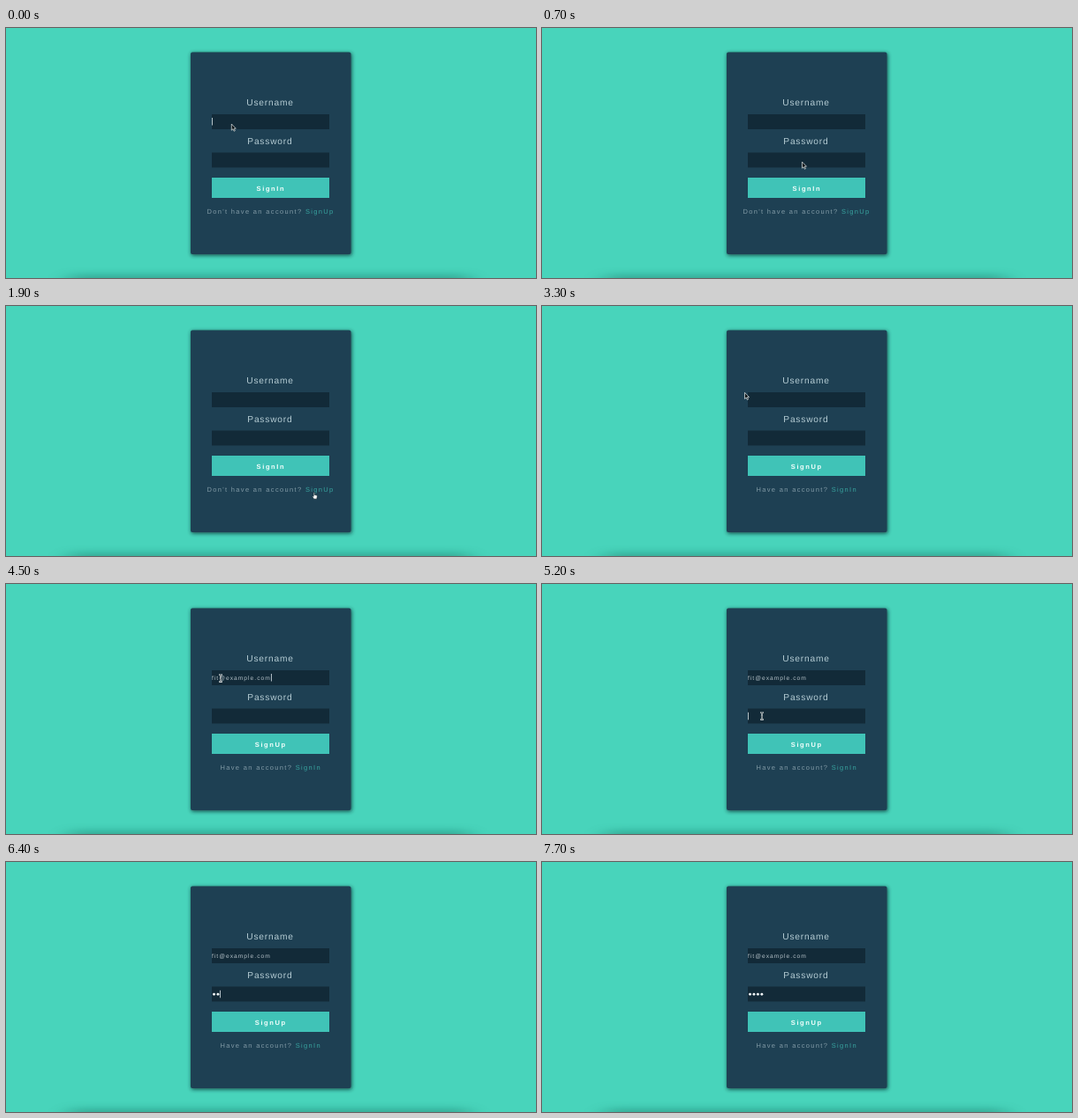
An HTML page that plays this animation: 600x284 px, repeating every 8000 ms.

```html
<!DOCTYPE html>
<html lang="en">
<head>
<meta charset="utf-8">
<title>Sign-in form</title>
<style>
  html, body { margin: 0; width: 100%; height: 100%; overflow: hidden; background: #48d4bb; }
  svg { display: block; width: 100%; height: 100%; }
  text { font-family: "Liberation Sans", Arial, sans-serif; text-rendering: geometricPrecision; white-space: pre; }
  .label { font-size: 10.2px; letter-spacing: .8px; fill: #b4cbd3; }
  .field { fill: #122a38; }
  .value { font-size: 6.7px; letter-spacing: 1px; fill: #b3c0c7; }
  .button { font-size: 7.5px; font-weight: bold; letter-spacing: 1.6px; fill: #f4fffd; }
  .footer { font-size: 7.5px; letter-spacing: 1.34px; fill: #8099a5; }
  .link { fill: #38a39f; }
  .hint { font-size: 6.35px; fill: #eceeef; }
</style>
</head>
<body>
<svg viewBox="0 0 600 284">
  <defs>
    <filter id="soft" x="-10%" y="-10%" width="120%" height="120%"><feGaussianBlur stdDeviation="2.2"/></filter>
    <filter id="wide" x="-20%" y="-200%" width="140%" height="500%"><feGaussianBlur stdDeviation="12 5"/></filter>
  </defs>
  <rect width="600" height="284" fill="#48d4bb"/>
  <rect x="72" y="281" width="452" height="20" fill="#0c5c50" opacity=".4" filter="url(#wide)"/>

  <rect x="209.5" y="28.5" width="182" height="230" rx="2" fill="#08262c" opacity=".75" filter="url(#soft)"/>
  <rect x="209" y="27.5" width="181.5" height="229.5" rx="2" fill="#1e4053"/>
  <text class="label" x="272.3" y="88.3">Username</text>
  <rect class="field" x="233" y="98" width="133" height="17"/>
  <text class="label" x="273.3" y="132">Password</text>
  <rect class="field" x="233" y="141.5" width="133" height="17"/>
  <text class="value" id="email" x="233" y="108.8"></text>
  <g id="dots" fill="#eef3f5"></g>

  <rect x="233" y="170" width="133" height="23" fill="#40c3b7"/>
  <g id="signIn">
    <text class="button" x="283.6" y="184.5">SignIn</text>
    <text class="footer" x="227.4" y="211.3">Don't have an account? <tspan class="link">SignUp</tspan></text>
  </g>
  <g id="signUp">
    <text class="button" x="281.8" y="184.5">SignUp</text>
    <text class="footer" x="242.4" y="211.3">Have an account? <tspan class="link">SignIn</tspan></text>
  </g>

  <g id="popup">
    <rect x="233" y="161" width="169.5" height="19" rx="2" opacity=".55" filter="url(#soft)"/>
    <rect x="233" y="159.5" width="169.5" height="19.5" rx="1.5" fill="#242528"/>
    <circle cx="242.3" cy="169.4" r="3.7" fill="#d9604f"/>
    <text class="hint" x="252" y="171.6">Use passwords saved in your Vunpal Account</text>
  </g>

  <rect id="caret" width=".8" height="8.5" fill="#dce6ea"/>
  <g id="pointer">
    <path id="arrow" d="M0 0V7.2L1.7 5.7L2.8 8.2L4 7.7L2.9 5.2H5Z" fill="#10171b" stroke="#e8eeee" stroke-width=".7"/>
    <path id="hand" d="M-.6 .4Q0-.5 .6 .4V2.8L3 3.3Q3.6 3.6 3.5 4.6L3 7.4H-.2L-2 4.7Q-1.7 3.8-.6 4.6Z" fill="#fff" stroke="#14252c" stroke-width=".6"/>
    <g id="beam" fill="none">
      <path d="M-2-4Q0-4 0-3Q0-4 2-4M0-3V3M-2 4Q0 4 0 3Q0 4 2 4M-1 1H1" stroke="#e3e9eb" stroke-width="1.7"/>
      <path d="M-1.8-4Q0-4 0-3Q0-4 1.8-4M0-3V3M-1.8 4Q0 4 0 3Q0 4 1.8 4M-1 1H1" stroke="#27343a" stroke-width=".6"/>
    </g>
  </g>
</svg>
<script>
const LOOP = 8000;
const EMAIL = "fit@example.com";
const DOT_TIMES = [6100, 6400, 6800, 7200];
const DOT_STEP = 4.45;
// time, x, y
const PATH = [
  [0, 255.3, 109], [300, 255.3, 109], [1200, 348.8, 211.8], [2900, 348.8, 211.8],
  [3300, 229.5, 98.3], [3700, 243, 107.2], [4500, 243, 107.2], [5200, 249, 150]
];
const USER_CARET = [[0, 400], [900, 1300], [3700, 5000]];
const PASS_CARET = [[5200, 5800], [6100, 7700]];

const $ = id => document.getElementById(id);
const show = (id, on) => $(id).setAttribute("visibility", on ? "visible" : "hidden");
const within = (t, spans) => spans.some(([from, to]) => t >= from && t < to);
const ease = p => p * p * (3 - 2 * p);

function pointerAt(t) {
  const next = PATH.findIndex(key => key[0] > t);
  if (next < 0) return PATH[PATH.length - 1].slice(1);
  const [t0, x0, y0] = PATH[next - 1], [t1, x1, y1] = PATH[next];
  const p = ease((t - t0) / (t1 - t0));
  return [x0 + (x1 - x0) * p, y0 + (y1 - y0) * p];
}

function typedCount(t) {
  if (t < 4000) return 0;
  return t < 4500 ? Math.min(12, 3 + 3 * Math.floor((t - 4000) / 100)) : EMAIL.length;
}

DOT_TIMES.forEach((_, i) => {
  const dot = document.createElementNS($("dots").namespaceURI, "circle");
  dot.setAttribute("cx", 235.5 + DOT_STEP * i);
  dot.setAttribute("cy", 150.2);
  dot.setAttribute("r", 1.45);
  $("dots").append(dot);
});

function draw(t) {
  show("signIn", t < 2000);
  show("signUp", t >= 2000);
  show("popup", t >= 5300 && t < 6200);

  const email = $("email");
  const typed = EMAIL.slice(0, typedCount(t));
  if (email.textContent !== typed) email.textContent = typed;
  const dotCount = DOT_TIMES.filter(time => t >= time).length;
  [...$("dots").children].forEach((dot, i) => dot.setAttribute("visibility", i < dotCount ? "visible" : "hidden"));

  const inUser = within(t, USER_CARET);
  show("caret", inUser || within(t, PASS_CARET));
  $("caret").setAttribute("x", 233.2 + (inUser ? (typed ? email.getComputedTextLength() : 0) : DOT_STEP * dotCount));
  $("caret").setAttribute("y", inUser ? 102 : 145.8);

  $("pointer").setAttribute("transform", `translate(${pointerAt(t)})`);
  const onLink = t >= 1100 && t < 3000, onField = t >= 3500 && t < 6100;
  show("hand", onLink);
  show("beam", onField);
  show("arrow", t < 3500 && !onLink);
}

function tick() {
  draw(performance.now() % LOOP);
  requestAnimationFrame(tick);
}
tick();
</script>
</body>
</html>
```
